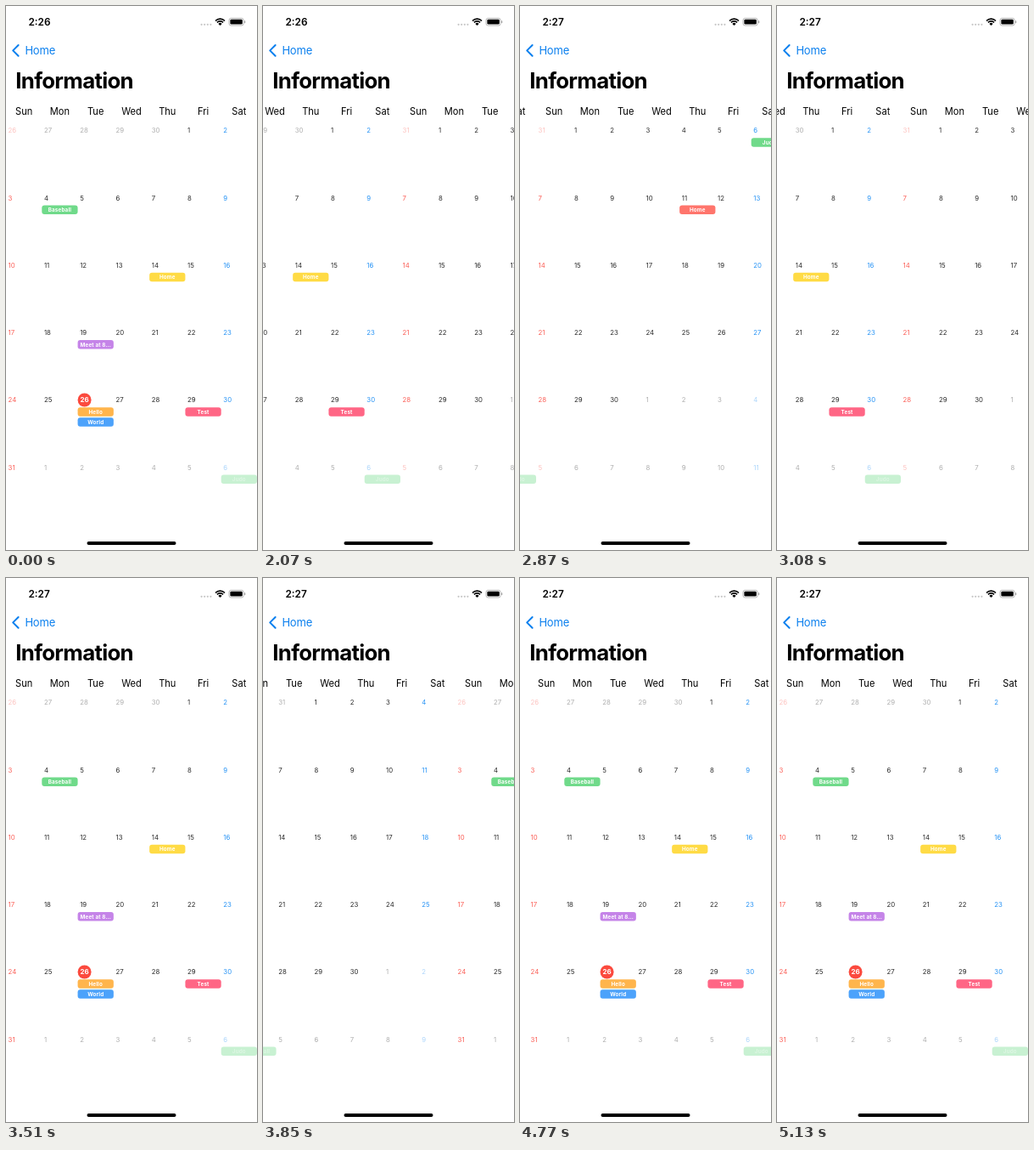
An HTML page with a canvas for the animation above (5.37 s loop, 296 px wide and 640 px high).

```html
<!DOCTYPE html>
<html lang="en">
<head>
<meta charset="utf-8">
<title>Calendar</title>
<style>
  html, body { margin: 0; width: 100%; height: 100%; overflow: hidden; background: #fff; }
  canvas { display: block; width: 296px; height: 640px; }
</style>
</head>
<body>
<canvas id="stage"></canvas>
<script>
const W = 296, H = 640, LOOP = 5370, COL = W / 7, ROW = 79.25;
const FONT = 'Inter, Roboto, sans-serif';
const DAYS = ['Sun', 'Mon', 'Tue', 'Wed', 'Thu', 'Fri', 'Sat'];
const GREEN = '#70da8a', BLUE = '#4ca2fb';

// Events keyed by "month-day", months counted from zero
const EVENTS = {
  '4-4': [['Baseball', GREEN]],
  '4-14': [['Home', '#ffdb45']],
  '4-19': [['Meet at 8…', '#c584e8']],
  '4-26': [['Hello', '#ffb54c'], ['World', BLUE]],
  '4-29': [['Test', '#ff6685']],
  '5-6': [['Judo', GREEN]],
  '5-11': [['Home', '#ff756c']]
};

// Scroll position of the May page: [ms, px], held until the next step
const SCROLL = [
  [0, 0],
  [2070, -134], [2170, -246], [2270, -287], [2370, -296],
  [2870, -277], [2980, -150], [3090, -36], [3200, -2], [3510, 0],
  [3630, 32], [3740, 128], [3850, 227], [3950, 280], [4050, 296],
  [4320, 288], [4430, 258], [4550, 210], [4650, 70], [4770, 10], [4880, 0]
];

const canvas = document.getElementById('stage');
const ctx = canvas.getContext('2d');
const dpr = window.devicePixelRatio || 1;
canvas.width = W * dpr;
canvas.height = H * dpr;

function text(str, x, y, size, { weight = 400, color = '#000', align = 'left', gap = 0 } = {}) {
  ctx.font = `${weight} ${size}px ${FONT}`;
  ctx.letterSpacing = gap + 'px';
  ctx.textAlign = align;
  ctx.fillStyle = color;
  ctx.fillText(str, x, y);
}

function pill(x, y, w, h, r, color) {
  ctx.fillStyle = color;
  ctx.beginPath();
  ctx.roundRect(x, y, w, h, r);
  ctx.fill();
}

function dot(x, y, r, color) {
  ctx.fillStyle = color;
  ctx.beginPath();
  ctx.arc(x, y, r, 0, Math.PI * 2);
  ctx.fill();
}

function drawDay(date, col, row, month) {
  const x = col * COL, mid = 146.5 + row * ROW;
  const m = date.getMonth(), d = date.getDate();
  const today = m === 4 && d === 26 && month === 4;
  ctx.globalAlpha = m === month ? 1 : 0.38;
  if (today) {
    dot(x + 8, mid, 8, '#fb4a3e');
    text(d, x + 8, mid + 2.9, 8, { weight: 700, color: '#fff', align: 'center' });
  } else {
    const color = col === 0 ? '#fb5f57' : col === 6 ? '#2793f5' : '#2b2b2b';
    text(d, x + 2.6, mid + 2.9, 7.8, { color });
  }
  (EVENTS[m + '-' + d] || []).forEach(([label, color], i) => {
    const top = mid + 8.8 + i * 12;
    pill(x, top, COL, 10.4, 3, color);
    text(label, x + COL / 2, top + 7.5, 6.3, { weight: 700, color: '#fff', align: 'center', gap: 0.15 });
  });
  ctx.globalAlpha = 1;
}

function drawMonth(month, left) {
  if (left <= -W || left >= W) return;
  ctx.save();
  ctx.translate(left, 0);
  DAYS.forEach((name, i) => text(name, (i + 0.5) * COL, 128, 11.1, { align: 'center' }));
  const lead = new Date(2020, month, 1).getDay();
  for (let k = 0; k < 42; k++) {
    drawDay(new Date(2020, month, 1 - lead + k), k % 7, Math.floor(k / 7), month);
  }
  ctx.restore();
}

function drawWifi(x, y) {
  const a = Math.PI * 0.25;
  ctx.strokeStyle = '#000';
  ctx.lineWidth = 1.7;
  for (const r of [7.8, 5.1]) {
    ctx.beginPath();
    ctx.arc(x, y, r, -Math.PI / 2 - a, -Math.PI / 2 + a);
    ctx.stroke();
  }
  ctx.fillStyle = '#000';
  ctx.beginPath();
  ctx.moveTo(x, y);
  ctx.arc(x, y, 3, -Math.PI / 2 - a, -Math.PI / 2 + a);
  ctx.fill();
}

function drawChrome(clock) {
  text(clock, 26.5, 23, 11.8, { weight: 600 });
  for (let i = 0; i < 4; i++) dot(230.6 + i * 3.6, 21.8, 1.1, '#c6c6c6');
  drawWifi(252.5, 23);
  ctx.strokeStyle = '#a5a5a5';
  ctx.lineWidth = 0.8;
  ctx.beginPath();
  ctx.roundRect(263, 14.4, 17.2, 8.6, 2.4);
  ctx.stroke();
  pill(264.4, 15.8, 14.4, 5.8, 1.4, '#000');
  pill(281.1, 17.2, 1.2, 3, 0.6, '#a5a5a5');

  ctx.strokeStyle = '#0a7fee';
  ctx.lineWidth = 2;
  ctx.lineCap = ctx.lineJoin = 'round';
  ctx.beginPath();
  ctx.moveTo(14.6, 46);
  ctx.lineTo(8.2, 52.4);
  ctx.lineTo(14.6, 58.8);
  ctx.stroke();
  ctx.lineCap = 'butt';
  text('Home', 22.4, 57, 13, { color: '#0a7fee', gap: -0.2 });
  text('Information', 11.3, 96.5, 25.8, { weight: 700, gap: -0.7 });
  pill(95.5, 630, 105, 4, 2, '#000');
}

function draw(t) {
  const x = SCROLL.findLast(([start]) => start <= t)[1];
  ctx.setTransform(dpr, 0, 0, dpr, 0, 0);
  ctx.fillStyle = '#fff';
  ctx.fillRect(0, 0, W, H);
  [3, 4, 5].forEach(month => drawMonth(month, x + (month - 4) * W));
  drawChrome(t < 2870 ? '2:26' : '2:27');
}

const begin = performance.now();
function tick() {
  draw((performance.now() - begin) % LOOP);
  requestAnimationFrame(tick);
}
tick();
</script>
</body>
</html>
```
